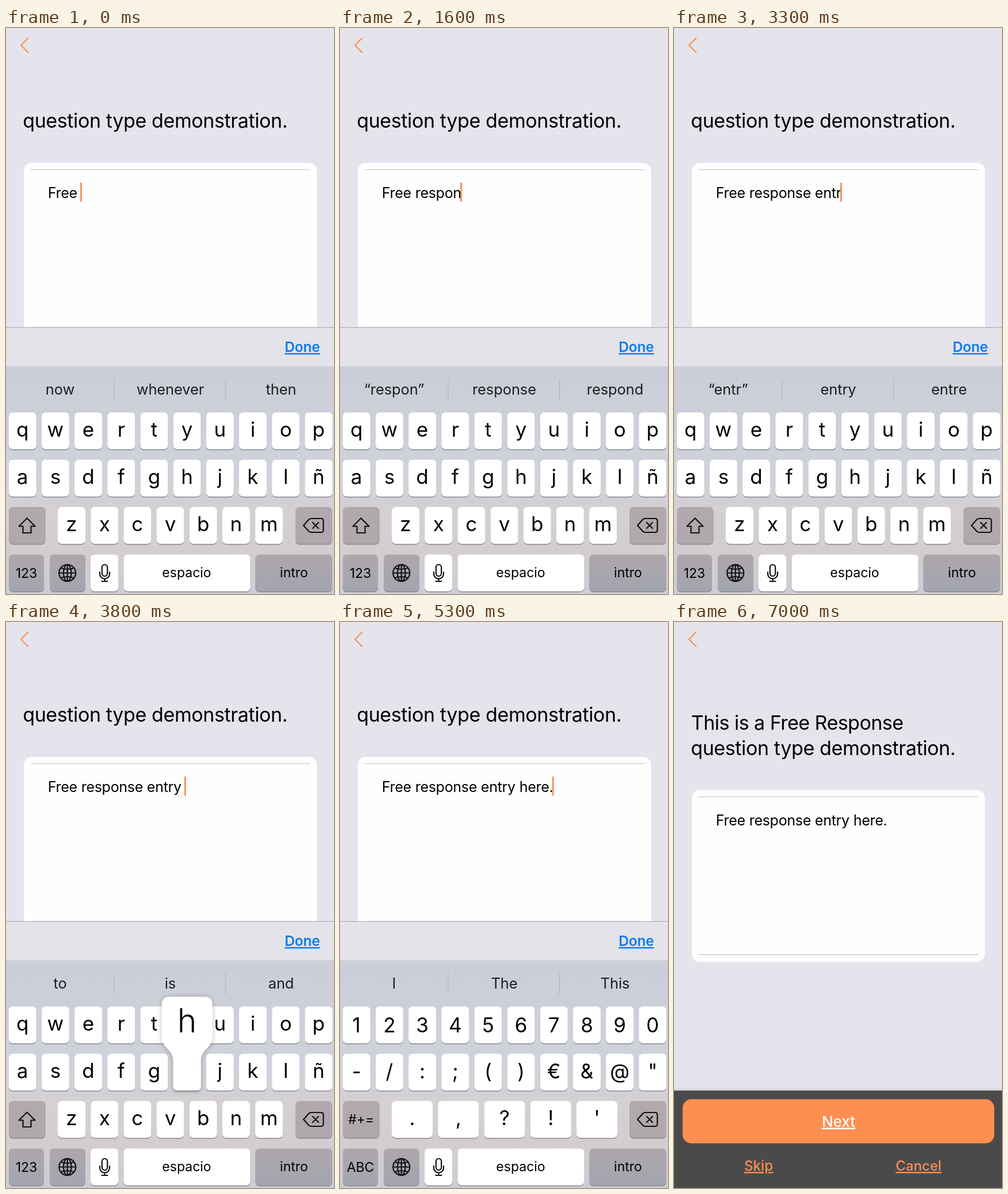
Recreate the animation shown at these times as an HTML page. Size 570 by 982 pixels, loop 7100 ms.

```html
<!DOCTYPE html>
<html lang="en">
<head>
<meta charset="utf-8">
<title>Free response</title>
<style>
html, body { margin: 0; width: 100%; height: 100%; overflow: hidden; background: #e5e4ec; }
svg { display: block; width: 100%; height: 100%; }
text { font-family: Inter, "Liberation Sans", sans-serif; font-optical-sizing: none; white-space: pre; fill: #000; }
.title { font-size: 34px; letter-spacing: -.53px; }
.wide { letter-spacing: -.38px; }
.body { font-size: 25px; letter-spacing: -.27px; }
.mid { text-anchor: middle; }
.link { text-decoration: underline; text-decoration-thickness: 2px; text-underline-offset: 3px; }
.pred { font-size: 25.4px; letter-spacing: -.05px; fill: #1d1d20; }
.key { font-size: 35px; font-weight: 400; }
.small { font-size: 23px; }
.icon { fill: none; stroke: #111; stroke-width: 2.2; stroke-linejoin: round; stroke-linecap: round; }
</style>
</head>
<body>
<svg id="stage" viewBox="0 0 570 982">
  <defs>
    <linearGradient id="kbFill" gradientUnits="userSpaceOnUse" x1="0" y1="587" x2="0" y2="982">
      <stop offset="0" stop-color="#cbced6"/>
      <stop offset=".48" stop-color="#cfd2da"/>
      <stop offset=".68" stop-color="#d6cfd1"/>
      <stop offset=".82" stop-color="#d4cdd0"/>
      <stop offset="1" stop-color="#cccdd5"/>
    </linearGradient>
    <linearGradient id="darkFill" gradientUnits="userSpaceOnUse" x1="0" y1="831" x2="0" y2="978">
      <stop offset="0" stop-color="#b2a9ad"/>
      <stop offset=".55" stop-color="#aea7ab"/>
      <stop offset="1" stop-color="#a3a5b0"/>
    </linearGradient>
    <linearGradient id="edge" x1="0" y1="0" x2="0" y2="1">
      <stop offset="0" stop-color="#000" stop-opacity="0"/>
      <stop offset="1" stop-color="#000" stop-opacity=".12"/>
    </linearGradient>
    <filter id="lift" x="-30%" y="-20%" width="160%" height="140%">
      <feDropShadow dx="0" dy="1" stdDeviation="4" flood-color="#000" flood-opacity=".28"/>
    </filter>
    <clipPath id="view"><rect y="143" width="570" height="670"/></clipPath>
  </defs>

  <rect width="570" height="982" fill="#e5e4ec"/>
  <path d="M39 17 26 30 39 43" fill="none" stroke="#ff8b4d" stroke-width="2"/>

  <g clip-path="url(#view)">
    <g id="page">
      <text class="title" x="29.8" y="129.4">This is a Free Response</text>
      <text class="title wide" x="29.2" y="173">question type demonstration.</text>
      <rect x="31" y="234" width="509.5" height="298" rx="14" fill="#fffeff"/>
      <path d="M42.5 245.7H529M42.5 519.4H529" stroke="#c9c8cd" stroke-width="1.3"/>
      <text class="body" id="entry" x="72.8" y="295"></text>
      <rect id="caret" y="268" width="3" height="33.5" rx="1" fill="#f5925c"/>
    </g>
  </g>

  <rect y="808" width="570" height="5" fill="url(#edge)"/>
  <rect y="813" width="570" height="169" fill="#4b4a4b"/>
  <rect x="15" y="828" width="541.5" height="76.5" rx="15" fill="#ff8f50"/>
  <text class="mid link" x="286" y="875.5" font-size="26" font-weight="500" style="fill:#fff">Next</text>
  <text class="mid link" x="147" y="952" font-size="24.2" font-weight="500" style="fill:#ff8f50">Skip</text>
  <text class="mid link" x="425" y="952" font-size="24" font-weight="500" style="fill:#ff8f50">Cancel</text>

  <rect id="boardBg" width="570" fill="url(#kbFill)"/>
  <g id="board">
    <g id="preds"><path d="M188 609V646M381.5 609V646" stroke="#b4b8c0" stroke-width="1.4"/></g>
    <g id="letters"></g>
    <g id="digits"></g>
    <g id="common"></g>
  </g>
  <g id="bar">
    <rect y="519" width="570" height="68" fill="#e4e3ea"/>
    <path d="M0 519.5H570" stroke="#a8a7ad" stroke-width="1.2"/>
    <text id="done" class="mid link" x="515" y="562" font-size="24.5" font-weight="600" letter-spacing="-.2">Done</text>
  </g>
  <g id="popup">
    <path id="bubble" fill="#fff" filter="url(#lift)"/>
    <path id="foot" stroke="#8b8c90" stroke-width="1.5" fill="none"/>
    <text id="big" class="mid" font-size="57" font-weight="350"></text>
  </g>
</svg>
<script>
const LOOP = 7100, STEP = 100, HOLD = 130;
const SYMBOLS = 5000, TAP = 5560, SLIDE = 5698;
const $ = id => document.getElementById(id);

function add(parent, tag, attrs, text) {
  const el = document.createElementNS("http://www.w3.org/2000/svg", tag);
  for (const k in attrs) el.setAttribute(k, attrs[k]);
  if (text) el.textContent = text;
  parent.appendChild(el);
  return el;
}

// ---- keyboard ----
const ROW = [667, 749, 831, 913.5], PITCH = 57.18, H = 64;
const keys = {};

function cap(parent, x, y, w, fill = "#fff") {
  add(parent, "rect", { x, y: y + 1.6, width: w, height: H, rx: 7, fill: "#8b8b90" });
  return add(parent, "rect", { x, y, width: w, height: H, rx: 7, fill });
}

function row(parent, chars, x, y, w, pitch, drop) {
  [...chars].forEach((ch, i) => {
    const kx = x + i * pitch;
    cap(parent, kx, y, w);
    add(parent, "text", { class: "key mid", x: kx + w / 2, y: y + drop }, ch);
    keys[ch] = { x: kx, y, w };
  });
}

const label = (parent, x, y, text) =>
  add(parent, "text", { class: "small mid", x, y }, text);
const icon = (parent, d) => add(parent, "path", { class: "icon", d });

const letters = $("letters"), digits = $("digits"), common = $("common");
const dark = "url(#darkFill)";

for (const g of [letters, digits]) cap(g, 5, ROW[2], 63.5, dark);
row(letters, "qwertyuiop", 4.7, ROW[0], 48, PITCH, 42);
row(letters, "asdfghjklñ", 4.7, ROW[1], 48, PITCH, 42);
row(letters, "zxcvbnm", 90, ROW[2], 48, PITCH, 42);
row(digits, "1234567890", 4.7, ROW[0], 48, PITCH, 45);
row(digits, "-/:;()€&@\"", 4.7, ROW[1], 48, PITCH, 43);
row(digits, ".,?!'", 90, ROW[2], 71.2, 80.2, 42);

icon(letters, "M36.5 850.5 50.5 864.5H43.5V876H29.5V864.5H22.5Z");
label(digits, 36.7, 871, "#+=");

cap(common, 503, ROW[2], 64, dark);
const modeCap = cap(common, 5, ROW[3], 61, dark);
cap(common, 76, ROW[3], 62, dark);
cap(common, 147, ROW[3], 48);
const spaceCap = cap(common, 204.5, ROW[3], 220);
cap(common, 433.5, ROW[3], 133.5, dark);

icon(common, "M517 863 526 853Q528 851 530.5 851H547.5Q551.5 851 551.5 855V871Q551.5 875 547.5 875H530.5Q528 875 526 873Z");
icon(common, "M533 858 543 868M543 858 533 868");
add(common, "circle", { class: "icon", cx: 106.7, cy: 945.5, r: 14.5 });
add(common, "ellipse", { class: "icon", cx: 106.7, cy: 945.5, rx: 6.8, ry: 14.5 });
icon(common, "M106.7 931V960M92.2 945.5H121.2M95.5 937Q106.7 941 118 937M95.5 954Q106.7 950 118 954");
add(common, "rect", { class: "icon", x: 166.8, y: 931, width: 9.4, height: 20, rx: 4.7 });
icon(common, "M163 944V947A8.5 8.5 0 0 0 180 947V944M171.5 955.5V960M166.5 960H176.5");
const modeText = label(common, 35.5, 954, "123");
label(common, 314, 953, "espacio");
label(common, 500.5, 953, "intro");

const predText = [94, 285.5, 478].map(x =>
  add($("preds"), "text", { class: "pred mid", x, y: 636 }));

// ---- typing: press time and key ----
const START = "Free ";
const presses = [
  [250, "r"], [500, "e"], [740, "s"], [960, "p"], [1220, "o"], [1430, "n"],
  [1640, "s"], [1860, "e"], [2100, " "], [2370, "e"], [2650, "n"], [2880, "t"],
  [3080, "r"], [3370, "y"], [3570, " "], [3770, "h"], [3950, "e"], [4080, "r"],
  [4230, "e"], [5170, "."]
];

// ---- suggestions: start time and three words ----
const hints = [
  [0, "now whenever then"],
  [400, "“r” really right"],
  [700, "“re” really read"],
  [900, "“res” research response"],
  [1100, "“resp” response respect"],
  [1400, "“respo” response respond"],
  [1600, "“respon” response respond"],
  [1800, "“respons” response responses"],
  [2000, "“response” responses responded"],
  [2300, "from to and"],
  [2500, "“e” even every"],
  [2800, "“en” end enough"],
  [3100, "“ent” entry enter"],
  [3300, "“entr” entry entre"],
  [3500, "“entry” entry entryway"],
  [3700, "to is and"],
  [3900, "“h” has here"],
  [4500, "“here” here’s hereby"],
  [5300, "I The This"]
];

function bubblePath(k) {
  const w = Math.max(88, k.w + 20), r = 14;
  const L = Math.min(Math.max(k.x + k.w / 2 - w / 2, 4.5), 567 - w), R = L + w;
  const T = k.y - 99, B = k.y + H, kl = k.x, kr = Math.min(k.x + k.w, R);
  const d = `M${L + r} ${T}H${R - r}Q${R} ${T} ${R} ${T + r}V${T + 70}` +
    `C${R} ${T + 90} ${kr} ${T + 90} ${kr} ${T + 112}V${B - 7}Q${kr} ${B} ${kr - 7} ${B}` +
    `H${kl + 7}Q${kl} ${B} ${kl} ${B - 7}V${T + 112}` +
    `C${kl} ${T + 90} ${L} ${T + 90} ${L} ${T + 70}V${T + r}Q${L} ${T} ${L + r} ${T}Z`;
  return { d, cx: (L + R) / 2, T, foot: `M${kl + 4} ${B + .6}H${kr - 4}` };
}

const show = (el, on) => el.setAttribute("display", on ? "inline" : "none");
const shift = (el, y) => el.setAttribute("transform", `translate(0 ${y})`);

// critically damped spring, 0 to 1
function spring(ms) {
  const a = 18.3 * Math.max(0, ms) / 1000;
  return 1 - (1 + a) * Math.exp(-a);
}

function draw(t) {
  const text = START + presses.filter(p => t >= p[0] + HOLD).map(p => p[1]).join("");
  const held = presses.find(p => t >= p[0] && t < p[0] + HOLD);
  const sliding = t >= SLIDE, symbols = t >= SYMBOLS;
  const p = spring(t - SLIDE);

  $("entry").textContent = text;
  show($("caret"), !sliding);
  $("caret").setAttribute("x", 71 + $("entry").getComputedTextLength());

  shift($("page"), 57.6 * p);
  shift($("board"), 395 * p);
  shift($("bar"), 464 * p);

  // the tint stays fixed to the screen while the keys slide
  const top = Math.min(982, (sliding ? 656 : 587) + 395 * p);
  $("boardBg").setAttribute("y", top);
  $("boardBg").setAttribute("height", 982 - top);
  show($("preds"), !sliding);
  show(letters, !symbols);
  show(digits, symbols);
  modeText.textContent = symbols ? "ABC" : "123";
  modeCap.setAttribute("fill", t >= SYMBOLS - 100 && t < SYMBOLS + 100 ? "#fff" : dark);
  spaceCap.setAttribute("fill", held && held[1] === " " ? "#b3b3ba" : "#fff");
  $("done").style.fill = t >= TAP ? "#6fb1f2" : "#0b7cf0";

  const words = hints.filter(h => t >= h[0]).pop()[1].split(" ");
  predText.forEach((el, i) => { el.textContent = words[i]; });

  const key = held && keys[held[1]];
  show($("popup"), key);
  if (key) {
    const b = bubblePath(key);
    $("bubble").setAttribute("d", b.d);
    $("foot").setAttribute("d", b.foot);
    $("big").textContent = held[1];
    $("big").setAttribute("x", b.cx);
    $("big").setAttribute("y", b.T + 62);
  }
}

const begin = performance.now();
function tick() {
  const t = (performance.now() - begin) % LOOP;
  draw(Math.floor(t / STEP) * STEP);
  requestAnimationFrame(tick);
}
tick();
</script>
</body>
</html>
```
